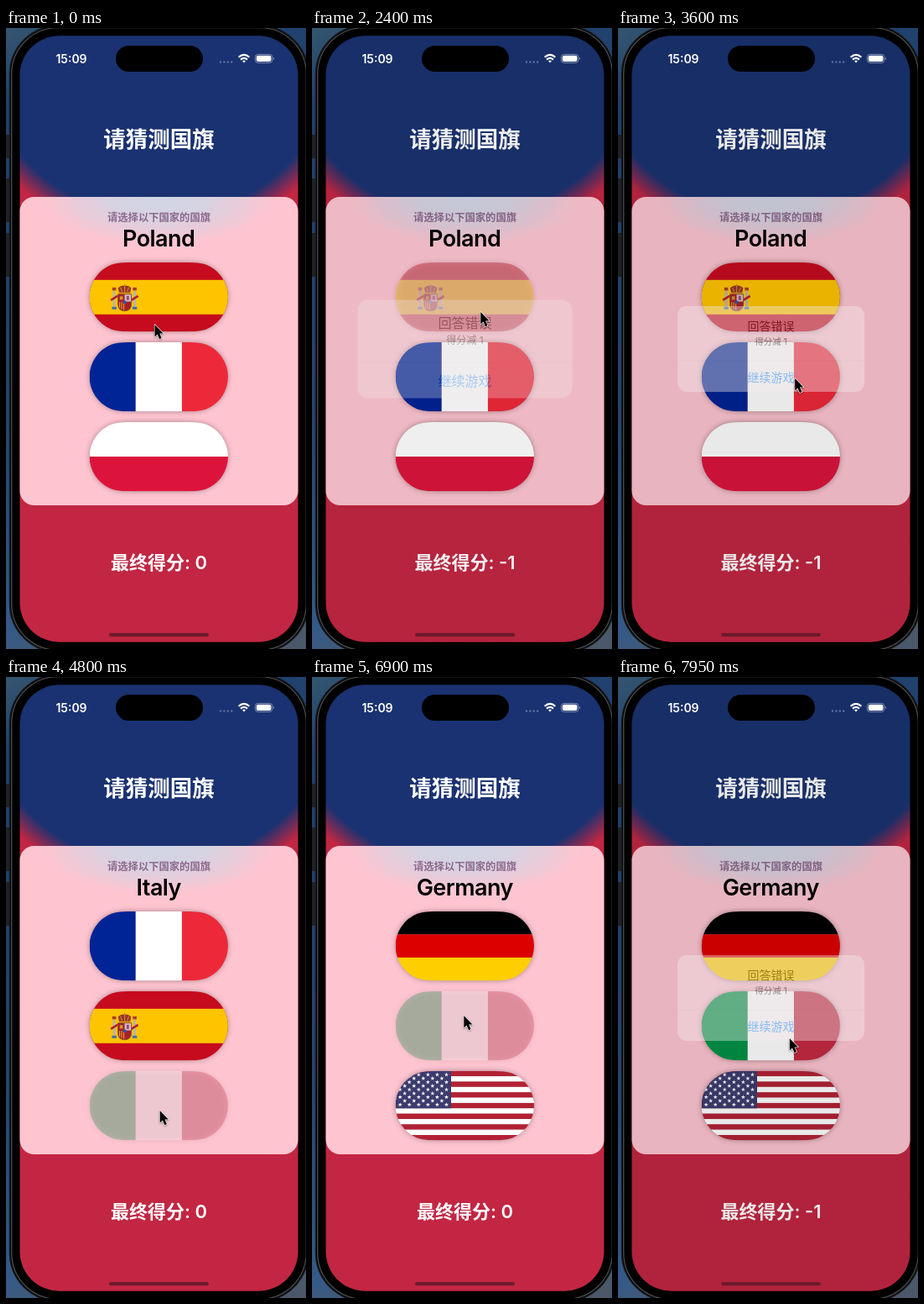
Animation, 358 px wide and 739 px high, one loop 8000 ms. Source, as an HTML page:

```html
<!DOCTYPE html>
<html lang="zh">
<head>
<meta charset="utf-8">
<title>请猜测国旗</title>
<style>
  html, body { margin: 0; width: 100%; height: 100%; overflow: hidden; background: #1f3d68; }
  svg { display: block; width: 358px; height: 739px; }
  text { font-family: Inter, "Noto Sans CJK SC", "Noto Sans CJK", sans-serif; text-anchor: middle; }
  .title { font-size: 26.5px; font-weight: 700; fill: #fff; }
  .hint { font-size: 12.3px; font-weight: 800; fill: #8c6a8d; }
  .country { font-size: 27px; font-weight: 600; letter-spacing: -.55px; }
  .score { font-size: 22px; font-weight: 600; fill: #fff; }
  .clock { font-size: 14px; font-weight: 600; fill: #fff; }
  .shadow { fill: rgba(0, 0, 0, .33); filter: blur(3px); }
  .verdict { font-size: 14px; font-weight: 500; fill-opacity: .8; }
  .points { font-size: 10.5px; fill-opacity: .9; }
  .resume { font-size: 14px; fill: #007aff; }
</style>
</head>
<body>
<svg viewBox="0 0 358 739">
  <defs>
    <linearGradient id="desk" x2=".25" y2="1">
      <stop stop-color="#34566f"/><stop offset=".12" stop-color="#1f406e"/>
      <stop offset=".6" stop-color="#24466f"/><stop offset=".92" stop-color="#355a88"/>
      <stop offset="1" stop-color="#4a5869"/>
    </linearGradient>
    <radialGradient id="sky" gradientUnits="userSpaceOnUse" cx="182.5" cy="9" r="250">
      <stop offset=".866" stop-color="#1a3271"/><stop offset=".98" stop-color="#c22642"/>
    </radialGradient>
    <radialGradient id="glass" gradientUnits="userSpaceOnUse" r="1"
                    gradientTransform="translate(182.5 201) scale(138 58)" cx="0" cy="0">
      <stop stop-color="#d1d5e5"/><stop offset=".4" stop-color="#d6d3e2"/>
      <stop offset=".72" stop-color="#e9cbd9"/><stop offset="1" stop-color="#fec5d1"/>
    </radialGradient>
    <path id="capsule" d="M0 41.3A41.3 41.3 0 0 1 26 3C35 0 45 0 63 0H102.5C120.5 0 130.5 0 139.5 3
      A41.3 41.3 0 0 1 139.5 79.6C130.5 82.6 120.5 82.6 102.5 82.6H63C45 82.6 35 82.6 26 79.6
      A41.3 41.3 0 0 1 0 41.3Z"/>
    <clipPath id="cut"><use href="#capsule"/></clipPath>
  </defs>

  <rect width="358" height="739" fill="url(#desk)"/>
  <path d="M0 127H5V155H0ZM0 179H5V231H0ZM0 244H5V296H0Z" fill="#202226"/>
  <rect x="4.5" y="-2.5" width="356" height="745" rx="57" fill="#000" stroke="#17191c" stroke-width="1.5"/>
  <rect x="6.7" y="-.3" width="351.6" height="740.6" rx="55" fill="none" stroke="#4a4c50" stroke-width="1.3"/>
  <rect x="16.5" y="9.3" width="332" height="721.4" rx="47" fill="url(#sky)"/>

  <text class="title" x="182.5" y="141.5">请猜测国旗</text>
  <rect x="16.5" y="201" width="332" height="367" rx="17" fill="url(#glass)"/>
  <text class="hint" x="182.5" y="229.7">请选择以下国家的国旗</text>
  <g id="rounds"></g>
  <text class="score" id="score" x="182.5" y="644"></text>

  <rect id="dim" x="16.5" y="9.3" width="332" height="721.4" rx="47"/>
  <g id="alert">
    <rect x="-111.5" y="-51" width="223" height="102" rx="11" fill="#f5ebee" fill-opacity=".95"/>
    <path d="M-111.5 14H111.5" stroke="#000" stroke-opacity=".1" stroke-width=".6"/>
    <text class="verdict" id="verdict" y="-21.6"></text>
    <text class="points" id="points" y="-5"></text>
    <text class="resume" y="38.6">继续游戏</text>
  </g>

  <text class="clock" x="78" y="42">15:09</text>
  <rect x="131" y="21" width="104" height="31" rx="15.5"/>
  <path d="M256 40.5H271" stroke="#5b6f9e" stroke-width="2.6" stroke-linecap="round" stroke-dasharray="0 4.4"/>
  <g fill="none" stroke="#fff" stroke-width="2.1">
    <path d="M277.6 34.8Q284 29 290.4 34.8M280 37.6Q284 34 288 37.6"/>
    <path d="M282 39.3Q284 37.7 286 39.3L284 41.4Z" fill="#fff" stroke="none"/>
  </g>
  <rect x="297.4" y="31.4" width="20.4" height="10" rx="3.2" fill="none" stroke="#8d9ab9" stroke-width=".9"/>
  <rect x="298.8" y="32.8" width="17.6" height="7.2" rx="2" fill="#fff"/>
  <path d="M319 34.8Q321 36.4 319 38.2Z" fill="#8d9ab9"/>
  <rect x="123" y="720" width="119" height="4.2" rx="2.1" fill="#6d1a2b"/>

  <path id="cursor" d="M0 0V14.4L3.2 11.5L5.7 17.2L8.2 16.1L5.8 10.5H10.2Z"
        stroke="#fff" stroke-width="1.2" stroke-linejoin="round" paint-order="stroke"
        style="filter: drop-shadow(0 1px 1px rgba(0,0,0,.35))"/>
</svg>

<script>
const LOOP = 8000, STEP = 150, W = 165.5, H = 82.6;
const $ = id => document.getElementById(id);

const rect = (x, y, w, h, fill) => `<rect x="${x}" y="${y}" width="${w}" height="${h}" fill="${fill}"/>`;
const rows = (...colors) => colors.map((c, i) => rect(0, i * H / colors.length, W, H / colors.length, c)).join('');
const columns = (...colors) => colors.map((c, i) => rect(i * W / colors.length, 0, W / colors.length, H, c)).join('');

function pillar(x) {
  return rect(x, 34, 3, 20, '#b9b5ad') + rect(x - 1.2, 53, 5.4, 3, '#3f6fa8') +
    rect(x - .8, 30, 4.6, 3.6, '#a5402c') +
    `<path d="M${x - 2.5} 45L${x + 5.5} 40" stroke="#b3202f" stroke-width="2.6"/>`;
}

function coatOfArms() {
  return pillar(28) + pillar(52.5) +
    '<path d="M34 38H50V50Q50 57.5 42 58Q34 57.5 34 50Z" fill="#a8202c" stroke="#7a4a2a" stroke-width=".8"/>' +
    rect(42, 38.4, 7.5, 8.3, '#d3bfc8') + rect(44.2, 40, 3, 5, '#934a80') +
    rect(36.2, 40.5, 3.6, 4, '#d09a26') +
    '<path d="M36 47.5V54M38.5 47.5V56M41 47.5V57" stroke="#e0a51c" stroke-width="1.1"/>' +
    '<circle cx="42" cy="47.5" r="2" fill="#2f55a0"/>' +
    '<path d="M35.5 36.5L34.2 30.5Q38 27 42 28Q46 27 49.8 30.5L48.5 36.5Z" fill="#98322b"/>' +
    '<path d="M35 36.2H49M42 26V36M37 30L39 35M47 30L45 35" stroke="#c4862a" stroke-width="1.2"/>';
}

function stars() {
  const star = Array.from({ length: 10 }, (_, i) => {
    const r = i % 2 ? 1.05 : 2.7, a = i * Math.PI / 5;
    return `${(r * Math.sin(a)).toFixed(2)},${(-r * Math.cos(a)).toFixed(2)}`;
  }).join(' ');
  let out = '';
  for (let row = 1; row < 10; row++)
    for (let col = row % 2 ? 1 : 2; col < 12; col += 2)
      out += `<polygon points="${star}" fill="#fff" transform="translate(${col * 5.53} ${row * 4.45})"/>`;
  return out;
}

const flags = {
  spain: rect(0, 0, W, H, '#c60b1e') + rect(0, 21, W, 41, '#ffc400') + coatOfArms(),
  france: columns('#002395', '#fff', '#ed2939'),
  poland: rows('#fff', '#dc143c'),
  italy: columns('#009246', '#fff', '#c42a40'),
  germany: rows('#000', '#d00', '#ffce00'),
  usa: rows(...Array.from({ length: 13 }, (_, i) => i % 2 ? '#fff' : '#b22234')) +
    rect(0, 0, 66.4, H * 7 / 13, '#3c3b6e') + stars()
};

const rounds = [
  { from: 0, country: 'Poland', flags: ['spain', 'france', 'poland'], pick: 0,
    press: 2100, show: 2250, hide: 3300, scored: 2100, score: -1, right: false },
  { from: 3900, country: 'Italy', flags: ['france', 'spain', 'italy'], pick: 2,
    press: 4800, show: 4800, hide: 5550, scored: 4800, score: 0, right: true },
  { from: 6150, country: 'Germany', flags: ['germany', 'italy', 'usa'], pick: 1,
    press: 6900, show: 6900, hide: 7650, scored: 7050, score: -1, right: false }
];

$('rounds').innerHTML = rounds.map(r => `<g>
  <text class="country" x="182.2" y="259.7">${r.country}</text>
  ${r.flags.map((name, i) => `<g class="flag" transform="translate(99.6 ${278.8 + i * 95})">
    <use class="shadow" href="#capsule"/><g clip-path="url(#cut)">${flags[name]}</g></g>`).join('')}
</g>`).join('');
const groups = [...$('rounds').children];
const picked = rounds.map((r, i) => groups[i].querySelectorAll('.flag')[r.pick]);

// Keys are [time, ...values]; values between keys are linear.
function track(keys, t) {
  const next = keys.findIndex(k => k[0] > t);
  if (next === 0) return keys[0].slice(1);
  if (next < 0) return keys.at(-1).slice(1);
  const a = keys[next - 1], b = keys[next], p = (t - a[0]) / (b[0] - a[0]);
  return a.slice(1).map((v, i) => v + (b[i + 1] - v) * p);
}

const fadeIn = [[0, 0], [150, .3], [300, .72], [450, .92], [600, 1]];
const fadeOut = [[0, 1], [150, .85], [300, .42], [450, .1], [600, 0]];
const release = [[0, .28], [150, .38], [300, .8], [450, 1]];
const pointer = [
  [0, 177.5, 353], [150, 177.5, 353.7], [300, 177.5, 353.7], [1200, 201.3, 338],
  [2700, 201.3, 338], [3300, 211.2, 417], [3600, 211.2, 417], [4050, 182.7, 518],
  [4200, 182.7, 518], [4500, 183.7, 516], [4800, 183.7, 516], [5400, 213.5, 413],
  [5850, 213.5, 413], [6600, 181.3, 403], [7050, 181.3, 403], [7800, 204.8, 430]
];

function draw(t) {
  const index = rounds.findLastIndex(r => t >= r.from);
  const round = rounds[index];
  groups.forEach((g, i) => g.style.display = i === index ? '' : 'none');

  // The shadow shows through a pressed flag, so both layers fade on their own.
  const pressed = t < round.press ? 1 : track(release, t - round.show)[0];
  for (const layer of picked[index].children) layer.style.opacity = pressed;
  const before = index ? rounds[index - 1].score : 0;
  $('score').textContent = `最终得分: ${t < round.scored ? before : round.score}`;

  const leaving = t >= round.hide;
  const shown = leaving ? track(fadeOut, t - round.hide)[0] : track(fadeIn, t - round.show)[0];
  const scale = leaving ? 1 : 1 + .21 * (1 - shown);
  $('dim').style.opacity = .21 * shown;
  $('alert').style.opacity = shown;
  $('alert').setAttribute('transform', `translate(182.5 382) scale(${scale})`);
  $('verdict').textContent = round.right ? '回答正确' : '回答错误';
  $('points').textContent = round.right ? '得分加 1' : '得分减 1';

  const [x, y] = track(pointer, t);
  $('cursor').setAttribute('transform', `translate(${x} ${y})`);
}

const start = performance.now();
function tick() {
  const t = (performance.now() - start) % LOOP;
  draw(Math.floor(t / STEP) * STEP);
  requestAnimationFrame(tick);
}
tick();
</script>
</body>
</html>
```
